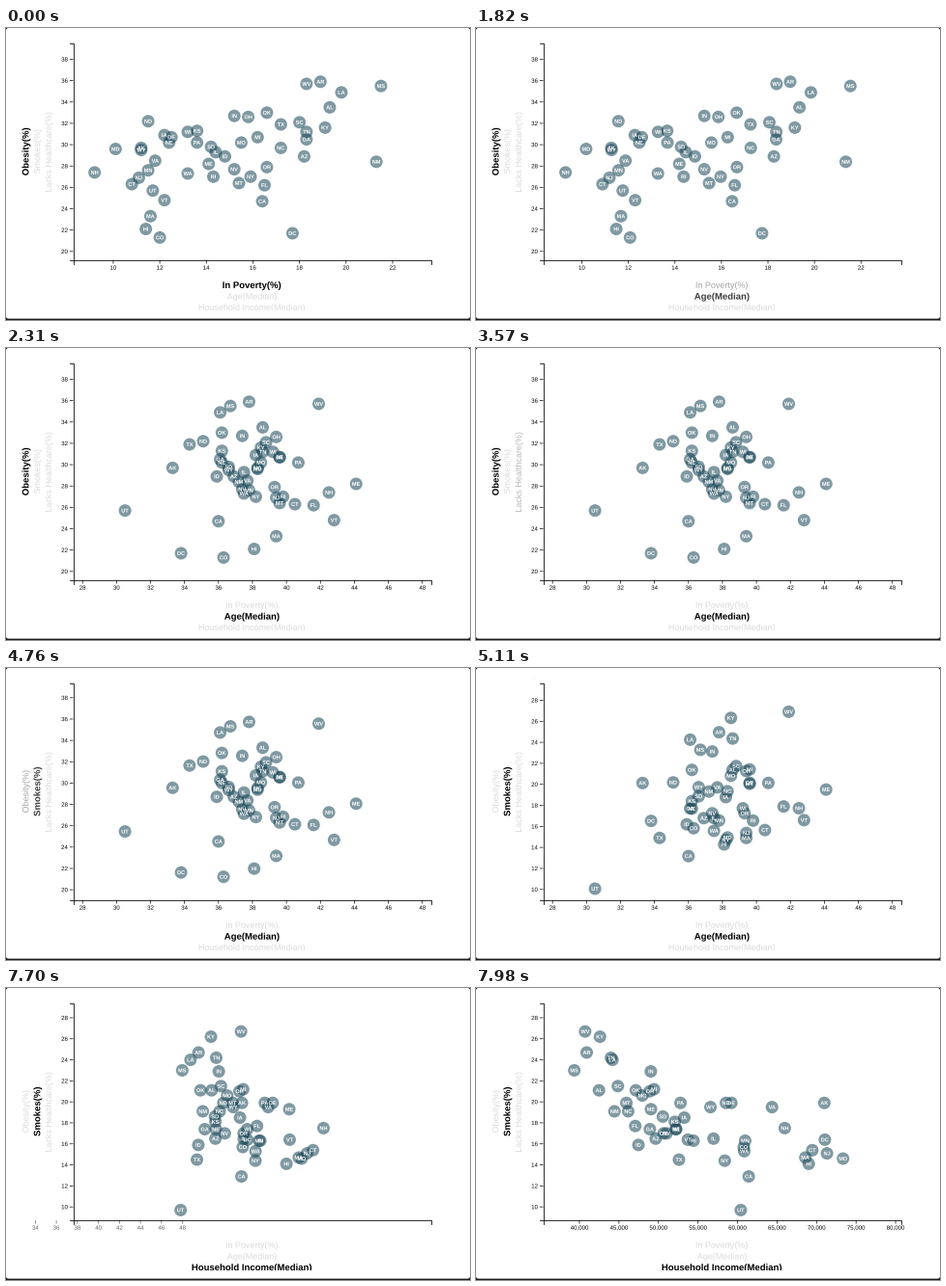
A matplotlib script for the animation above (8 s loop, 480x303 px).

```python
import numpy as np
import matplotlib.pyplot as plt
from matplotlib.animation import FuncAnimation
from matplotlib.collections import PathCollection
from matplotlib.patches import FancyBboxPatch, Rectangle
from matplotlib.path import Path
from matplotlib.textpath import TextPath
from matplotlib.transforms import Affine2D

W, H, DPI = 480, 303, 100
LOOP, INTERVAL = 8000, 20
TICK_MS = 70              # the picture is refreshed in steps of this length
TWEEN_STEP = 0.1333       # share of a chart transition covered per step
LEFT, RIGHT, TOP, BOTTOM = 69.5, 439.7, 16, 241

STATES = ("AL AK AZ AR CA CO CT DE DC FL GA HI ID IL IN IA KS KY LA ME MD MA MI "
          "MN MS MO MT NE NV NH NJ NM NY NC ND OH OK OR PA RI SC SD TN TX UT VT "
          "VA WA WV WI WY").split()

DATA = {
    "poverty": [19.3, 11.2, 18.2, 18.9, 16.4, 12, 10.8, 12.5, 17.7, 16.5, 18.3,
                11.4, 14.8, 14.4, 15.2, 12.2, 13.6, 19.1, 19.8, 14.1, 10.1, 11.6,
                16.2, 11.5, 21.5, 15.5, 15.4, 12.4, 15.2, 9.2, 11.1, 21.3, 15.9,
                17.2, 11.5, 15.8, 16.6, 16.6, 13.6, 14.3, 18, 14.2, 18.3, 17.2,
                11.7, 12.2, 11.8, 13.2, 18.3, 13.2, 11.2],
    "age": [38.6, 33.3, 36.9, 37.8, 36, 36.3, 40.5, 39.6, 33.8, 41.6, 36.1,
            38.1, 35.9, 37.5, 37.4, 38.2, 36.2, 38.5, 36.1, 44.1, 38.3, 39.4,
            39.6, 37.8, 36.7, 38.5, 39.6, 36.2, 37.4, 42.5, 39.4, 37.2, 38.2,
            38.3, 35.1, 39.4, 36.2, 39.3, 40.7, 39.8, 38.8, 36.6, 38.6, 34.3,
            30.5, 42.8, 37.7, 37.5, 41.9, 39.2, 36.6],
    "income": [42830, 71583, 50068, 41262, 61933, 61303, 70048, 59716, 71648,
               47463, 49321, 69592, 47861, 57444, 49446, 53712, 52504, 42958,
               44555, 49462, 73971, 69160, 49847, 61481, 39680, 48363, 46328,
               52686, 51450, 66532, 71919, 44803, 58878, 46556, 59029, 49308,
               47529, 51075, 53234, 54891, 45238, 50979, 44361, 53035, 60922,
               54166, 64902, 61366, 41059, 52622, 57055],
    "obesity": [33.5, 29.7, 28.9, 35.9, 24.7, 21.3, 26.3, 30.7, 21.7, 26.2, 30.5,
                22.1, 28.9, 29.3, 32.7, 30.9, 31.3, 31.6, 34.9, 28.2, 29.6, 23.3,
                30.7, 27.6, 35.5, 30.2, 26.4, 30.2, 27.7, 27.4, 26.9, 28.4, 27,
                29.7, 32.2, 32.6, 33, 27.9, 30.2, 27, 32.1, 29.8, 31.2, 31.9,
                25.7, 24.8, 28.5, 27.3, 35.7, 31.2, 29.5],
    "smokes": [21.1, 19.9, 16.5, 24.7, 12.9, 15.7, 15.4, 19.9, 16.4, 17.7, 17.4,
               14.1, 15.9, 16.5, 22.9, 18.5, 18.1, 26.2, 24, 19.3, 14.6, 14.7,
               21.2, 16.3, 23, 20.6, 19.9, 17.4, 17, 17.5, 15.1, 19.1, 14.4,
               19.1, 19.9, 21, 21.1, 17, 19.9, 16.3, 21.5, 18.6, 24.2, 14.5,
               9.7, 16.4, 19.5, 15.3, 26.7, 17.4, 19.5],
}
DATA = {key: np.array(values, float) for key, values in DATA.items()}

TICKS = {
    "poverty": range(10, 23, 2),
    "age": range(28, 49, 2),
    "income": range(40000, 80001, 5000),
    "obesity": range(20, 39, 2),
    "smokes": range(10, 29, 2),
}

# (start ms, progress at the first step, variable)
X_MOVES = [(0, 1, "poverty"), (1820, 0.1, "age"), (7490, 0.057, "income")]
Y_MOVES = [(0, 1, "obesity"), (4760, 0.155, "smokes")]

# Grey levels and fade times of the axis titles
IDLE, HOVER, ACTIVE = 0.86, 0.38, 0.0
SLOW, FAST, STEP = 262, 105, 50

# text, x, y, turned, [(start ms, grey, fade ms)]
TITLES = [
    ("In Poverty(%)", 254.3, 266.6, False,
     [(0, ACTIVE, STEP), (1820, IDLE, FAST), (6790, 0.7, STEP), (7490, IDLE, STEP)]),
    ("Age(Median)", 254.3, 278.3, False,
     [(0, IDLE, STEP), (980, HOVER, SLOW), (1820, ACTIVE, SLOW), (7490, IDLE, FAST)]),
    ("Household Income(Median)", 254.3, 289.7, False,
     [(0, IDLE, STEP), (6930, HOVER, SLOW), (7490, ACTIVE, SLOW)]),
    ("Obesity(%)", 20.1, 128.3, True,
     [(0, ACTIVE, STEP), (4760, IDLE, FAST)]),
    ("Smokes(%)", 32, 128.3, True,
     [(0, IDLE, STEP), (3710, HOVER, SLOW), (4760, ACTIVE, SLOW)]),
    ("Lacks Healthcare(%)", 43.8, 128.8, True,
     [(0, IDLE, STEP), (3570, 0.72, STEP), (3710, IDLE, FAST)]),
]

fig = plt.figure(figsize=(W / DPI, H / DPI), dpi=DPI, facecolor="#1c1c1c")
ax = fig.add_axes([0, 0, 1, 1])
ax.set_xlim(0, W)
ax.set_ylim(H, 0)
ax.axis("off")
px = Affine2D().scale(1 / DPI) + fig.dpi_scale_trans
view = Rectangle((14, 4), 450, 289, transform=ax.transData)


def glyphs(text, size, weight="normal", align=0.5):
    """Outline of a text, aligned on x and centred on its cap height."""
    path = TextPath((0, 0), text, size=size,
                    prop={"family": "Liberation Sans", "weight": weight})
    box = path.get_extents()
    return path.transformed(
        Affine2D().translate(-box.x0 - align * box.width, -0.35 * size))


def layer(paths, offsets, color, zorder):
    group = PathCollection(paths, offsets=offsets, transform=px,
                           offset_transform=ax.transData, facecolors=color,
                           edgecolors="none", linewidths=0, snap=False,
                           zorder=zorder)
    ax.add_collection(group, autolim=False)
    group.set_clip_path(view)
    return group


def bar(x, y, w, h):
    return Path.unit_rectangle().transformed(Affine2D().scale(w, h).translate(x, y))


def x_tick(value):
    text = glyphs(f"{value:,}", 6.1).transformed(Affine2D().translate(0, -7.6))
    return Path.make_compound_path(text, bar(-0.35, -3.6, 0.7, 3.6))


def y_tick(value):
    text = glyphs(str(value), 6.1, align=1).transformed(Affine2D().translate(-5.8, 0))
    return Path.make_compound_path(text, bar(-3.6, -0.35, 3.6, 0.7))


def title_path(text, turned, size, weight):
    return glyphs(text, size, weight).transformed(Affine2D().rotate_deg(90 * turned))


def scale(key, values, start, end):
    low, high = DATA[key].min() * 0.9, DATA[key].max() * 1.1
    return start + (values - low) / (high - low) * (end - start)


def cubic(u):
    u = min(u, 1)
    return 4 * u ** 3 if u < 0.5 else 1 - 4 * (1 - u) ** 3


def phase(t, moves):
    """Variable left, variable entered and eased progress between them."""
    old = new = moves[0][2]
    done = 1
    for start, first, key in moves[1:]:
        if t >= start:
            old, new = new, key
            done = cubic(first + TWEEN_STEP * ((t - start) // TICK_MS))
    return old, new, done


def grey(t, events):
    shade = events[0][1]
    for start, goal, fade in events:
        if t >= start:
            u = min(1, ((t - start) // TICK_MS + 0.75) * TICK_MS / fade)
            shade += (goal - shade) * (1 - (1 - u) ** 2)
    return shade


def is_bold(t, events):
    return [goal for start, goal, _ in events if t >= start][-1] == ACTIVE


class Axis:
    def __init__(self, moves, start, end, make_tick):
        self.moves, self.start, self.end = moves, start, end
        self.values = np.array(sorted({v for m in moves for v in TICKS[m[2]]}))
        paths = [make_tick(int(v)) for v in self.values]
        self.ticks = layer(paths, np.zeros((len(paths), 2)), "black", 2)

    def update(self, t):
        """Move the ticks and return the places of all states."""
        old, new, done = phase(t, self.moves)

        def place(data_old, data_new):
            a = scale(old, data_old, self.start, self.end)
            b = scale(new, data_new, self.start, self.end)
            return a + (b - a) * done

        spots = np.clip(place(self.values, self.values), -60, 560)
        colors = np.zeros((len(self.values), 4))
        colors[:, 3] = ((1 - done) * np.isin(self.values, TICKS[old])
                        + done * np.isin(self.values, TICKS[new]))
        self.ticks.set_facecolor(np.clip(colors, 0, 1))
        fixed = np.full(len(spots), BOTTOM if self.start == LEFT else LEFT)
        pair = (spots, fixed) if self.start == LEFT else (fixed, spots)
        self.ticks.set_offsets(np.column_stack(pair))
        return place(DATA[old], DATA[new])


# Window and axis lines
ax.add_patch(FancyBboxPatch((0, 0), W, 301.6, fc="white", ec="none", zorder=0,
                            boxstyle="round,pad=0,rounding_size=2.5"))
TICKS = {key: list(values) for key, values in TICKS.items()}
line = dict(color="black", lw=0.8 * 72 / DPI, zorder=2)
ax.plot([LEFT, LEFT, RIGHT, RIGHT], [BOTTOM + 3.6, BOTTOM, BOTTOM, BOTTOM + 3.6], **line)
ax.plot([LEFT - 3.6, LEFT, LEFT, LEFT - 3.6], [TOP, TOP, BOTTOM, BOTTOM], **line)

x_axis = Axis(X_MOVES, LEFT, RIGHT, x_tick)
y_axis = Axis(Y_MOVES, BOTTOM, TOP, y_tick)

origin = np.zeros((len(STATES), 2))
dots = layer([Path.circle(radius=6.5)] * len(STATES), origin,
             (0.09, 0.27, 0.34, 0.55), 3)
names = layer([glyphs(s, 5.6, "bold") for s in STATES], origin, "white", 4)

spots = [(x, y) for _, x, y, _, _ in TITLES]
light = layer([title_path(s, turn, 9, "normal") for s, _, _, turn, _ in TITLES],
              spots, "black", 5)
bold = layer([title_path(s, turn, 9.55, "bold") for s, _, _, turn, _ in TITLES],
             spots, "black", 5)


def draw(i):
    t = i * INTERVAL + INTERVAL // 2
    points = np.column_stack((x_axis.update(t), y_axis.update(t)))
    dots.set_offsets(points)
    names.set_offsets(points)
    shades = [(grey(t, events), is_bold(t, events)) for *_, events in TITLES]
    light.set_facecolor([(g, g, g, 0 if b else 1) for g, b in shades])
    bold.set_facecolor([(g, g, g, 1 if b else 0) for g, b in shades])
    return dots, names, light, bold, x_axis.ticks, y_axis.ticks


anim = FuncAnimation(fig, draw, frames=LOOP // INTERVAL, interval=INTERVAL,
                     repeat=True, repeat_delay=0)
plt.show()
```
